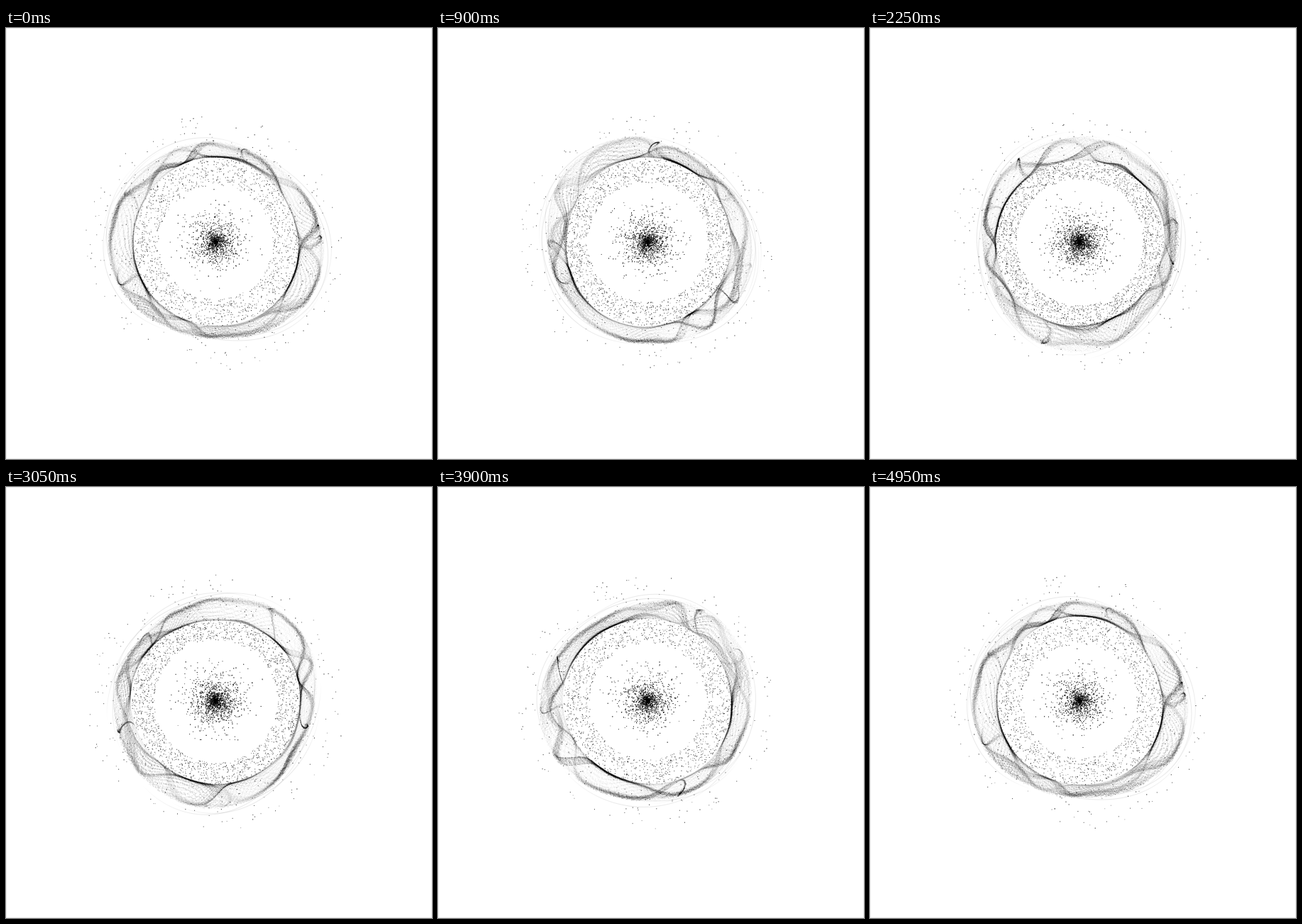
An HTML page with a canvas for the animation above (5000 ms loop, 600 by 608 pixels).

```html
<!DOCTYPE html>
<html>
<head>
<meta charset="utf-8">
<style>
  html, body { margin: 0; width: 100%; height: 100%; overflow: hidden; background: #fff; }
  canvas { display: block; }
</style>
</head>
<body>
<canvas id="stage" width="600" height="608"></canvas>
<script>
const W = 600, H = 608, LOOP = 5000, STEP = 50, TAU = Math.PI * 2;
const CX = 295, CY = 302, RING = 118;
const { sin, cos, sqrt, log, floor, max } = Math;
const ctx = document.getElementById('stage').getContext('2d');
const image = ctx.createImageData(W, H);
const pixels = new Uint32Array(image.data.buffer);
const ink = new Float32Array(W * H);

let seed = 7;
const random = () => (seed = (seed * 16807) % 2147483647) / 2147483647;
const mix = (a, b, k) => a + (b - a) * k;
const wave = x => (1 + sin(x)) / 2;

const makeDots = (count, place) => Array.from({ length: count }, () =>
  ({ angle: random() * TAU, place: place(), phase: random() * TAU, weight: .5 + random() * 1.5 }));
const core = makeDots(1700, () => Math.min(78 * sqrt(random()), 21 * (-log(random())) ** .8));
const belt = makeDots(2100, random);
const spray = makeDots(300, () => 124 + 56 * random() ** 1.5);
const grain = Float32Array.from({ length: 65536 }, () => random() + random() - 1);

// Adds ink around a point, shared between the four nearest pixels.
function splat(r, angle, weight) {
  const x = CX + r * cos(angle), y = CY + r * sin(angle);
  const ix = floor(x), iy = floor(y), fx = x - ix, fy = y - iy;
  const p = iy * W + ix;
  ink[p] += weight * (1 - fx) * (1 - fy);
  ink[p + 1] += weight * fx * (1 - fy);
  ink[p + W] += weight * (1 - fx) * fy;
  ink[p + W + 1] += weight * fx * fy;
}

const innerEdge = (a, q) => RING + 2 * sin(2 * a - q - .8) + 1.2 * sin(3 * a + q);
const veilDepth = (a, q) => 25 + 8 * cos(2 * a - q - .2) + 2 * sin(3 * a + q);

function drawDots(q) {
  const breath = cos(q + .4);
  const hole = 84.5 - 4.5 * breath, share = .87 - .13 * breath;
  const sway = (d, size) => d.angle + size * sin(q + d.phase);
  for (const d of core.slice(0, core.length * share))
    splat(d.place * (1 + .12 * sin(q + d.phase)), sway(d, .35), d.weight * 1.05);
  for (const d of belt.slice(0, belt.length * share))
    splat(sqrt(mix(hole ** 2, RING ** 2, d.place)), sway(d, .2), d.weight * .6);
  for (const d of spray)
    splat(d.place + 4 * cos(q + d.phase), sway(d, .15), d.weight * .7);
}

// A twisted ribbon of strands: ink gathers where it turns over.
function drawVeil(q) {
  const strands = 40, count = 1300;
  for (let i = 0; i < count; i++) {
    const a = i / count * TAU;
    const inner = innerEdge(a, q), depth = veilDepth(a, q);
    const edge = .12 + wave(3 * a - q + .3) ** 2;
    const twist = 2 * sin(2 * a + q) + sin(5 * a - 2 * q);
    for (let j = 0; j < strands; j++) {
      const s = j / strands * TAU, noise = grain[(i * 41 + j * 1009) & 65535];
      const v = ((1 - cos(s + twist + .8 * sin(3 * a + 2 * s + q))) / 2) ** 1.3;
      const smoke = .25 + 1.3 * wave(4 * a + 2 * s - q) * wave(3 * a - s + q);
      const weight = mix(.2 * edge, .14 * smoke, Math.min(1, v * 6));
      splat(inner + depth * v + noise * (1 + 2.5 * v), a + .07 * sin(4 * a + s - q) + noise * .01, weight);
    }
  }
}

// Pale loose threads drifting outside the veil.
function drawThreads(q) {
  const count = 1000;
  for (let n = 0; n < 6; n++) {
    for (let i = 0; i < count; i++) {
      const a = i / count * TAU;
      const lift = 5 + 6 * sin(2 * a + n * 1.6 + q) + 2 * sin(3 * a - n - q);
      splat(innerEdge(a, q) + veilDepth(a, q) + lift, a, .09 * max(0, sin(2 * a + n * .6 - .8 + sin(q))));
    }
  }
}

// Dark curls that cross the veil, each swelling and fading once per loop.
function drawCreases(q) {
  const curls = 14, count = 420;
  for (let n = 0; n < curls; n++) {
    const show = max(0, cos(q - n / curls * TAU)) ** 2;
    const angle = n * 2.4 + .3 * sin(q + n), lean = .22 * sin(n * 1.7);
    for (let i = 0; i < count; i++) {
      const u = i / count, a = angle + lean * u + .06 * sin(6 * u + n + q);
      const noise = grain[i * 53 + n * 211] * (.6 + 2.5 * wave(5 * u + n));
      const r = innerEdge(a, q) + veilDepth(a, q) * wave(4.5 * u - 1.57);
      splat(r + noise, a + noise * .012, .24 * show * sin(Math.PI * u));
    }
  }
}

function frame(now) {
  const q = floor((now % LOOP) / STEP) * STEP / LOOP * TAU;
  ink.fill(0);
  for (const draw of [drawDots, drawVeil, drawThreads, drawCreases]) draw(q);
  for (let i = 0; i < ink.length; i++) {
    const tone = Math.round(255 * Math.exp(-ink[i]));
    pixels[i] = (255 << 24) | (tone << 16) | (tone << 8) | tone;
  }
  ctx.putImageData(image, 0, 0);
  ctx.strokeStyle = '#ebebeb';
  ctx.strokeRect(.5, .5, W - 1, H - 1);
}

const start = performance.now();
function tick() {
  frame(performance.now() - start);
  requestAnimationFrame(tick);
}
tick();
</script>
</body>
</html>
```
